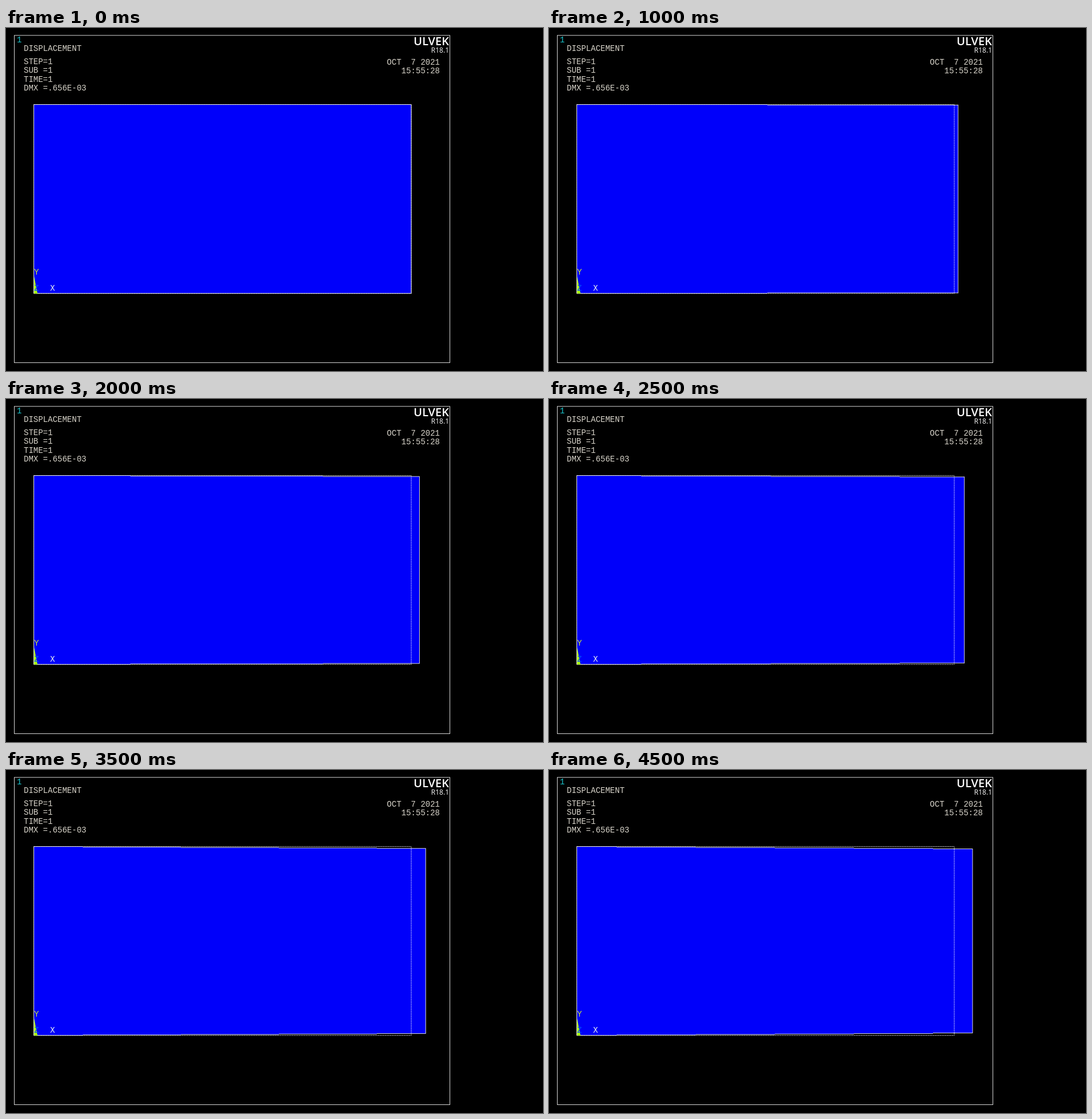
Recreate the animation shown at these times as an HTML page with a canvas. Size 937x598 px, loop 5000 ms.

```html
<!DOCTYPE html>
<html lang="en">
<head>
<meta charset="utf-8">
<title>Displacement plot</title>
<style>
  html, body { margin: 0; width: 100%; height: 100%; overflow: hidden; background: #000; }
  canvas { display: block; }
</style>
</head>
<body>
<canvas id="stage" width="937" height="598"></canvas>
<script>
const ctx = document.getElementById('stage').getContext('2d');
const STEP_MS = 500, STEPS = 10;
const DOT = 0.84; // size of one plot pixel on the stage
const LEFT = 48.5, TOP = 133.4, RIGHT = 707.1, BOTTOM = 462.75;
const MONO = '14px "Courier New", "Liberation Mono", monospace';
const SANS = '"Open Sans", "Noto Sans", sans-serif';
const INK = '#d8d4ca', WHITE = '#fff', BLUE = '#0000fa';

function box(x, y, w, h, color) {
  ctx.fillStyle = color;
  ctx.fillRect(x, y, w, h);
}

function hline(x0, x1, y) {
  box(x0, y - DOT / 2, x1 - x0, DOT, WHITE);
}

function vline(x, y0, y1) {
  box(x - DOT / 2, y0 - DOT / 2, DOT, y1 - y0 + DOT, WHITE);
}

function label(text, x, y, color = INK, font = MONO, align = 'left') {
  ctx.font = font;
  ctx.textAlign = align;
  ctx.fillStyle = color;
  ctx.fillText(text, x, y);
}

function outline(x0, y0, x1, y1, dash = []) {
  ctx.strokeStyle = WHITE;
  ctx.lineWidth = DOT;
  ctx.setLineDash(dash);
  ctx.strokeRect(x0, y0, x1 - x0, y1 - y0);
  ctx.setLineDash([]);
}

// The plate stretches to the right while its free end narrows in whole plot pixels.
function drawPlate(step) {
  const width = RIGHT - LEFT + DOT * Math.floor(4.286 * step);
  const right = LEFT + width;
  const shrink = Math.max(0, Math.round(0.54 * step - 0.08));
  const stairX = n => Math.round(LEFT + width * Math.min(1, Math.max(0, (n - 0.5) / (shrink || 1))));
  for (let n = 0; n <= shrink; n++) {
    const x0 = stairX(n);
    const x1 = n === shrink ? Math.round(right) : stairX(n + 1);
    const y0 = TOP + n * DOT, y1 = BOTTOM - n * DOT;
    box(x0, y0, x1 - x0, y1 - y0, BLUE);
    hline(x0, x1, y0);
    hline(x0, x1, y1);
  }
  vline(LEFT, TOP, BOTTOM);
  vline(right, TOP + shrink * DOT, BOTTOM - shrink * DOT);
  outline(LEFT, TOP, RIGHT, BOTTOM, [2, 1]);
}

function drawTriad() {
  ctx.fillStyle = '#a8ff10';
  ctx.beginPath();
  ctx.moveTo(49, 433);
  ctx.lineTo(55, 463);
  ctx.lineTo(49, 463);
  ctx.fill();
  label('Z', 49, 458, '#0048ff');
  label('Y', 49, 430, '#c9e632');
  label('X', 77, 458, '#e8eef0');
}

function drawLabels() {
  label('1', 19, 25, '#18c8d0');
  label('DISPLACEMENT', 31, 40);
  ['STEP=1', 'SUB =1', 'TIME=1', 'DMX =.656E-03'].forEach((line, i) =>
    label(line, 31, Math.round(63 + 15.4 * i)));
  label('OCT  7 2021', 664.6, 64);
  label('15:55:28', 689.8, 79);
  label('ULVEK', 773, 30, WHITE, '600 20px ' + SANS, 'right');
  label('R18.1', 773, 43, WHITE, '12px ' + SANS, 'right');
}

function draw(now) {
  const step = Math.floor(now / STEP_MS) % STEPS;
  box(0, 0, 937, 598, '#000');
  outline(14.5, 12.9, 774.6, 583.4);
  drawPlate(step);
  drawTriad();
  drawLabels();
}

function tick() {
  draw(performance.now());
  requestAnimationFrame(tick);
}
tick();
</script>
</body>
</html>
```
